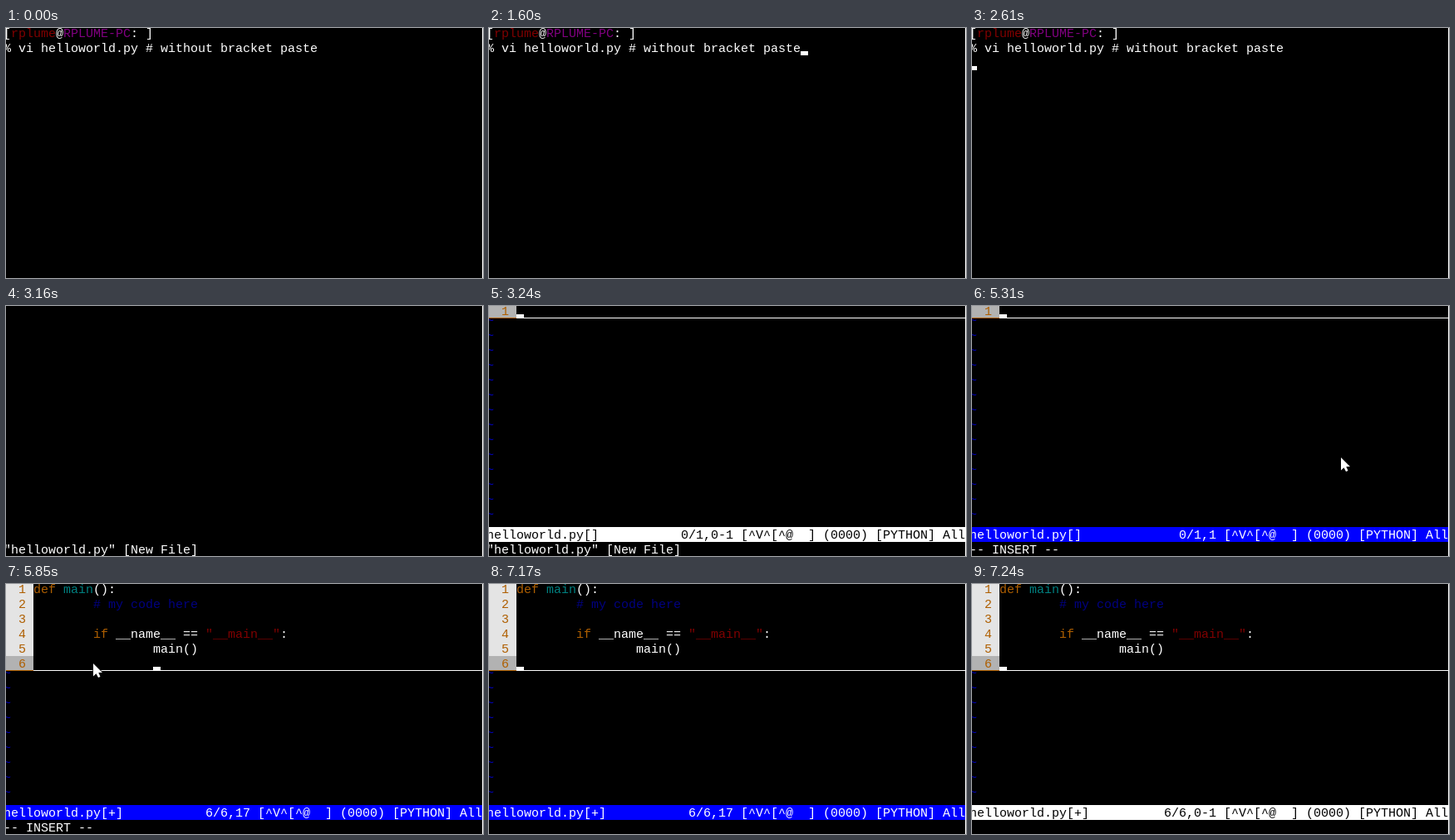
An HTML page that plays this animation: 574x302 px, repeating every 8000 ms.

```html
<!DOCTYPE html>
<html lang="en">
<head>
<meta charset="utf-8">
<title>Terminal paste</title>
<style>
  html, body { margin: 0; width: 100%; height: 100%; overflow: hidden; background: #000; }
  svg { display: block; width: 574px; height: 302px; background: #000; }
  text { font: 15px "Liberation Mono", monospace; white-space: pre; }
</style>
</head>
<body>
<svg id="stage" viewBox="0 0 574 302"></svg>
<script>
const LOOP = 8000, CW = 9, CH = 18, COLS = 64, WIDTH = 573;
const WHITE = '#fff', BROWN = '#af5f00', RED = '#800000', NAVY = '#000080',
      PURPLE = '#800080', TEAL = '#008080';

// Moments of the session
const OPEN = 3160, READY = 3240, INSERT = 4080, POINT = 4770,
      PASTE = 5850, ESCAPE = 7170, NORMAL = 7240;

const stage = document.getElementById('stage');
const colX = c => c * CW - 3;
const rowY = r => r * CH - 3;
const layers = [];

function add(parent, tag, attrs, content) {
  const el = document.createElementNS('http://www.w3.org/2000/svg', tag);
  for (const k in attrs) el.setAttribute(k, attrs[k]);
  if (content) el.textContent = content;
  return parent.appendChild(el);
}

// A group shown during [from, to).
function layer(from, to) {
  const el = add(stage, 'g', {});
  layers.push({ el, from, to });
  return el;
}

const box = (g, x, y, width, height, fill) => add(g, 'rect', { x, y, width, height, fill });
const put = (g, row, col, str, fill = WHITE) =>
  add(g, 'text', { x: colX(col), y: rowY(row) + 14, fill }, str);

// Writes [text, colour] runs one after another.
function runs(g, row, col, list) {
  for (const [str, fill] of list) {
    put(g, row, col, str, fill);
    col += str.length;
  }
}

const caret = (g, row, col) => box(g, colX(col), rowY(row) + 13, CW, 5, WHITE);

function gutter(g, count) {
  const numbers = colX(4);
  for (let i = 0; i < count; i++) {
    box(g, 0, rowY(i), numbers, CH, i === count - 1 ? '#b2b2b2' : '#e4e4e4');
    put(g, i, 2, String(i + 1), BROWN);
  }
  const y = rowY(count) - 1;
  box(g, 0, y, numbers, 1, BROWN);
  box(g, numbers, y, WIDTH - numbers, 1, WHITE);
  for (let r = count; r < 15; r++)
    add(g, 'text', { x: colX(0), y: rowY(r) + 7, fill: '#0000c0' }, '~');
}

function status(g, flag, pos, insert) {
  const fg = insert ? WHITE : '#000';
  const right = pos + ' [^V^[^@  ] (0000) [PYTHON] All';
  box(g, 0, rowY(15), WIDTH, CH, insert ? '#00f' : WHITE);
  put(g, 15, 0, 'helloworld.py' + flag, fg);
  put(g, 15, COLS - right.length, right, fg);
}

// Shell
const shell = layer(0, OPEN);
runs(shell, 0, 0, [['[', WHITE], ['rplume', RED], ['@', WHITE], ['RPLUME-PC', PURPLE], [': ]', WHITE]]);
put(shell, 1, 0, '% vi helloworld.py # without bracket paste');
caret(layer(1600, 2080), 1, 42);
caret(layer(2610, OPEN), 2, 0);

// Empty buffer
put(layer(OPEN, INSERT), 16, 0, '"helloworld.py" [New File]');
const empty = layer(READY, PASTE);
gutter(empty, 1);
caret(empty, 0, 4);
status(layer(READY, INSERT), '[]', '0/1,0-1', false);
status(layer(INSERT, PASTE), '[]', '0/1,1', true);
put(layer(INSERT, ESCAPE), 16, 0, '-- INSERT --');

// Pasted code
const code = layer(PASTE, LOOP);
gutter(code, 6);
runs(code, 0, 4, [['def', BROWN], [' main', TEAL], ['():', WHITE]]);
put(code, 1, 12, '# my code here', NAVY);
runs(code, 3, 12, [['if', BROWN], [' __name__ == ', WHITE], ['"__main__"', RED], [':', WHITE]]);
put(code, 4, 20, 'main()');
caret(layer(PASTE, ESCAPE), 5, 20);
caret(layer(ESCAPE, LOOP), 5, 4);
status(layer(PASTE, NORMAL), '[+]', '6/6,17', true);
status(layer(NORMAL, LOOP), '[+]', '6/6,0-1', false);

// Window edge
box(stage, WIDTH, 0, 1, 302, WHITE);

// Mouse pointer: sweeps in, settles on the code, then moves off to the right.
const pointer = add(layer(POINT, ESCAPE), 'path', {
  d: 'M0 0V15.5L3.5 12.2L6 17L8.5 16L6.3 11H11Z',
  fill: WHITE, stroke: '#000', 'stroke-width': 1.5, 'paint-order': 'stroke'
});
const STEP = 77;
const linear = p => p;
const smooth = p => p * p * (3 - 2 * p);
const enter = { x: 498, y: 253 }, left = { x: 35, y: 110 },
      click = { x: 105, y: 96 }, rest = { x: 470, y: 151 };
const glides = [
  { at: POINT, steps: 10, a: enter, b: left, easeX: p => p ** 6, easeY: p => p * p },
  { at: 5543, steps: 2, a: left, b: click, easeX: linear, easeY: linear },
  { at: 6004, steps: 5, a: click, b: rest, easeX: smooth, easeY: smooth }
];

function movePointer(t) {
  const { at, steps, a, b, easeX, easeY } = glides.filter(g => g.at <= t).pop() || glides[0];
  const done = Math.floor((t - at) / STEP + 0.05);
  const p = Math.min(1, Math.max(0, done / steps));
  const x = Math.round(a.x + (b.x - a.x) * easeX(p));
  const y = Math.round(a.y + (b.y - a.y) * easeY(p));
  pointer.setAttribute('transform', `translate(${x} ${y})`);
}

function render(t) {
  for (const { el, from, to } of layers)
    el.setAttribute('display', t >= from && t < to ? 'inline' : 'none');
  movePointer(t);
}

const start = performance.now();
function tick() {
  render((performance.now() - start) % LOOP);
  requestAnimationFrame(tick);
}
render(0);
requestAnimationFrame(tick);
</script>
</body>
</html>
```
